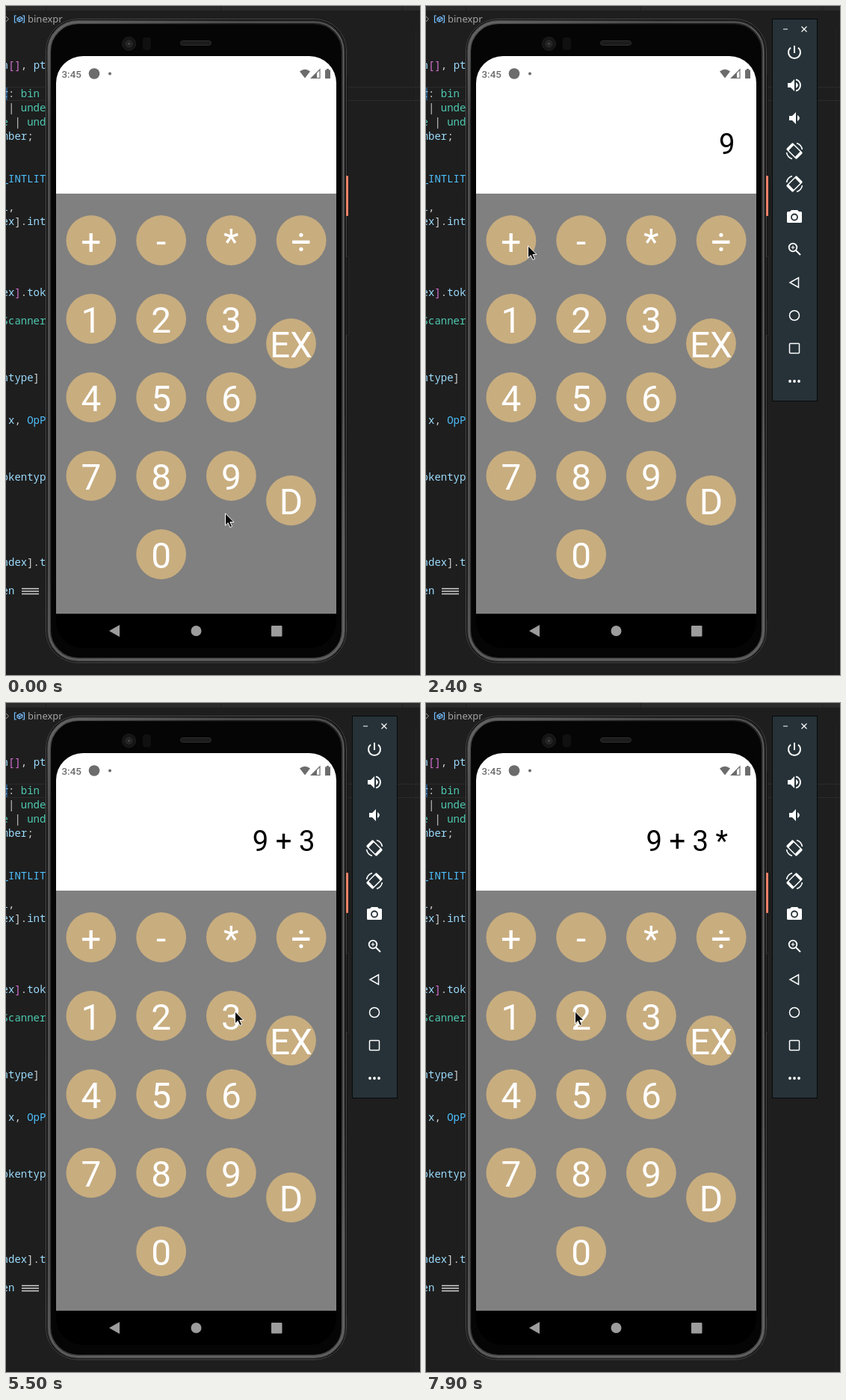
An HTML page for the animation above (8 s loop, 554x895 px).

```html
<!DOCTYPE html>
<html lang="en">
<head>
<meta charset="utf-8">
<title>Calculator</title>
<style>
html, body { margin: 0; width: 100%; height: 100%; overflow: hidden; background: #1e1e1e; }
svg { display: block; width: 554px; height: 895px; }
text { white-space: pre; }
.code { font: 14px "Noto Sans Mono", "DejaVu Sans Mono", monospace; }
.crumb { font: 13px "Noto Sans", sans-serif; fill: #a5a5a5; }
.key { font: 47.75px Roboto, sans-serif; fill: #fff; text-anchor: middle; }
.out { font: 38.2px Roboto, sans-serif; fill: #000; text-anchor: end; }
.clock { font: 500 13.4px Roboto, sans-serif; fill: #6c6c6c; }
.line { fill: none; stroke: #fff; stroke-width: 2; }
.thin { stroke-width: 1.5; }
</style>
</head>
<body>
<svg viewBox="0 0 554 895">
  <defs>
    <linearGradient id="rim" x2=".25" y2="1">
      <stop offset="0" stop-color="#5a5a5a"/>
      <stop offset=".15" stop-color="#2c2c2c"/>
      <stop offset=".8" stop-color="#303030"/>
      <stop offset="1" stop-color="#4c4c4c"/>
    </linearGradient>
  </defs>

  <!-- editor -->
  <rect width="554" height="895" fill="#1e1e1e"/>
  <rect width="554" height="6" fill="#2b2b2c"/>
  <path d="M53.5 0v6M287.5 0v6M530.5 0v6" stroke="#202020"/>
  <path d="M0 108.5H554M0 126.5H554" stroke="#2b2b2b"/>
  <path d="M548.5 30V895" stroke="#232323"/>
  <rect y="109" width="2" height="17" fill="#264f78"/>
  <path d="M-1 13l4.500 4.500l-4.500 4.500" fill="none" stroke="#a0a0a0"/>
  <g fill="none" stroke="#75beff" stroke-width="1.200">
    <path d="M14 13h-2.500v9H14M22 13h2.500v9H22"/>
    <path d="M15 16.500l4-2l3 1.500v3l-4 2l-3-1.500zM15 16.500l3 1.500l4-2M18 18v3"/>
  </g>
  <text class="crumb" x="29" y="22">binexpr</text>
  <g id="code" class="code"></g>
  <path d="M21 779.500H44M21 783H44M21 786.500H44" stroke="#d4d4d4" stroke-width="1.300"/>

  <!-- phone body -->
  <rect x="53" y="17" width="403" height="862" rx="43" fill="#0a0a0a"/>
  <rect x="53.500" y="17.500" width="402" height="861" rx="42.500" fill="none" stroke="#4a4a4a"/>
  <rect x="57.500" y="21.500" width="394" height="853" rx="39" fill="none" stroke="url(#rim)" stroke-width="5"/>
  <rect x="57.500" y="21.500" width="394" height="853" rx="39" fill="none" stroke="#6e6e6e" stroke-width="1.200"/>
  <rect x="61" y="25" width="387" height="846" rx="36" fill="#050505"/>
  <path d="M456.500 92V821" stroke="#111"/>
  <rect x="455" y="227" width="3" height="54" rx="1" fill="#ee8168"/>
  <rect x="455.500" y="335" width="3" height="106" rx="1.500" fill="#151515" stroke="#333" stroke-width=".7"/>
  <circle cx="164.500" cy="50.500" r="9" fill="#151515" stroke="#1e1e1e"/>
  <circle cx="164.500" cy="50.500" r="4.500" fill="#222" stroke="#303030"/>
  <circle cx="164.500" cy="50.500" r="1.500" fill="#484848"/>
  <rect x="183" y="42" width="11" height="17" rx="4" fill="#101010"/>
  <rect x="233.500" y="46.500" width="41" height="6" rx="3" fill="#1c1c1c" stroke="#2d2d2d"/>

  <!-- phone screen -->
  <path d="M67 251V103a36 36 0 0 1 36-36H406a36 36 0 0 1 36 36V251z" fill="#fff"/>
  <rect x="67" y="251" width="375" height="562" fill="#808080"/>
  <path d="M67 813H442V823a36 36 0 0 1-36 36H103a36 36 0 0 1-36-36z" fill="#000"/>
  <text class="clock" x="74.500" y="95.700">3:45</text>
  <g fill="#6c6c6c">
    <circle cx="118" cy="90.500" r="7.300"/>
    <circle cx="139" cy="90.500" r="2"/>
    <path d="M393 87.500q7-5.500 14 0l-7 9z"/>
    <path d="M420 85v11.500h-11.500z" fill="none" stroke="#6c6c6c" stroke-width="1.200"/>
    <path d="M416 89v7.500h-7.500z"/>
    <path d="M427 85.500h2v-1.500h3v1.500h2v11.500h-7z"/>
  </g>
  <g fill="#9c9c9c">
    <path d="M138 836l14-8v16z"/>
    <circle cx="254.500" cy="836" r="7"/>
    <rect x="355" y="829" width="14.500" height="14.500" rx="1"/>
  </g>
  <text id="out" class="out" x="413.400" y="198"></text>
  <g id="keys"></g>

  <!-- emulator toolbar -->
  <g id="panel" fill="#fff">
    <rect x="463.500" y="17.500" width="60" height="511" fill="#263238" stroke="#07090a"/>
    <path class="line" style="stroke-width:1.200" d="M478 31h6M502.500 27.500l7 7m0-7l-7 7"/>
    <g transform="translate(493 62)"><path class="line" d="M0-9V1M-5-6.200A8 8 0 1 0 5-6.200"/></g>
    <g transform="translate(493 106)">
      <path d="M-9-3h4l5-5v16l-5-5h-4zM2-4q6 4 0 8z"/>
      <path class="line" d="M2-7.500A7.700 7.700 0 0 1 2 7.500"/>
    </g>
    <path transform="translate(493 150)" d="M-7-3h4l5-5v16l-5-5h-4zM4-4q6 4 0 8z"/>
    <g id="turn" transform="translate(493 194)">
      <g transform="rotate(45)">
        <rect class="line thin" x="-9" y="-5.500" width="18" height="11" rx="1"/>
        <path d="M-9-5.500h3v11h-3zM6-5.500h3v11h-3z"/>
      </g>
      <path class="line thin" d="M-10.500 2A11 11 0 0 0-3 10.500M10.500-2A11 11 0 0 0 3-10.500"/>
    </g>
    <use href="#turn" transform="translate(986 44) scale(-1 1)"/>
    <g transform="translate(493 282)">
      <path d="M-4-9h8l2 2h2.500q1.500 0 1.500 1.500v12q0 1.500-1.500 1.500h-17q-1.500 0-1.500-1.500v-12q0-1.500 1.500-1.500h2.500z"/>
      <circle cy=".5" r="4" fill="#fff" stroke="#263238" stroke-width="1.800"/>
    </g>
    <g transform="translate(493 325)">
      <circle class="line" cx="-2" cy="-2" r="5.300" style="stroke-width:1.800"/>
      <path class="line" d="M2 2l6 6"/>
      <path class="line" style="stroke-width:1.200" d="M-4.500-2h5M-2-4.500v5"/>
    </g>
    <path class="line thin" d="M487 370l11.500-6.500v13z"/>
    <circle class="line thin" cx="493" cy="414" r="6.500"/>
    <rect class="line thin" x="486.500" y="451.500" width="13" height="13" rx="1"/>
    <circle cx="487" cy="502" r="1.900"/>
    <circle cx="493" cy="502" r="1.900"/>
    <circle cx="499" cy="502" r="1.900"/>
  </g>

  <path id="mouse" d="M.5.8V17l3.700-3.500l2.700 6l2.700-1.200l-2.700-5.900h5.100z" fill="#0a0a0a" stroke="#fff" stroke-width="1"/>
</svg>
<script>
const NS = "http://www.w3.org/2000/svg";
const $ = id => document.getElementById(id);

function add(parent, tag, attrs = {}, text = "") {
  const el = document.createElementNS(NS, tag);
  for (const k in attrs) el.setAttribute(k, attrs[k]);
  el.textContent = text;
  return parent.appendChild(el);
}

// Code fragments: line middle, then colour letter + text, on an 8.4 px grid
const ink = { v: "#9cdcfe", t: "#4ec9b0", c: "#4fc1ff", p: "#d4d4d4", b: "#da70d6" };
const lines = [
  [79, "vn", "b[]", "p, ", "vpt"],
  [117, "vr", "p: ", "tbin"],
  [136, "p | ", "tunde"],
  [155, "te", "p | ", "tund"],
  [174, "vmber", "p;"],
  [231, "c_INTLIT"],
  [269, "vl", "p,"],
  [288, "vex", "p].", "vint"],
  [383, "vex", "b]", "p.", "vtok"],
  [421, "tScanner"],
  [497, "vntype", "p]"],
  [554, "v x", "p, ", "cOpP"],
  [630, "vokentyp"],
  [744, "vndex", "p].", "vt"],
  [782, "ven"]
];
for (const [y, ...parts] of lines) {
  const row = add($("code"), "text", { x: -5.4, y: y + 5 });
  for (const s of parts) add(row, "tspan", { fill: ink[s[0]] }, s.slice(1));
}

const keys = {};
function addKey(label, x, y) {
  const g = keys[label] = add($("keys"), "g");
  add(g, "circle", { cx: x, cy: y, r: 33.4, fill: "#c8ad7f" });
  add(g, "text", { class: "key", x, y: y + 18.8 }, label);
}
["+-*÷", "123", "456", "789", " 0"].forEach((row, r) =>
  [...row].forEach((label, c) => {
    if (label !== " ") addKey(label, 113.9 + 93.75 * c, 313.5 + 105 * r);
  }));
addKey("EX", 381.5, 451.5);
addKey("D", 381.5, 661.5);

// key, press time, release time, display afterwards
const taps = [
  ["9", 1300, 1440, "9"],
  ["+", 2900, 2990, "9 + "],
  ["3", 4700, 4860, "9 + 3"],
  ["*", 6400, 6498, "9 + 3 * "]
];

// time, x, y of the pointer tip
const path = [
  [100, 293, 678], [500, 298, 655], [900, 304, 625], [1000, 304, 625], [1100, 303, 624],
  [1700, 303, 624], [1900, 285, 585], [2100, 240, 500], [2300, 150, 345], [2400, 136, 320],
  [3200, 136, 320], [3700, 198, 398], [3900, 250, 427], [4100, 298, 439], [4200, 311, 432],
  [4300, 308, 422], [4600, 307, 420], [5400, 307, 420], [5500, 306, 412], [5700, 302, 392],
  [6000, 308, 350], [6200, 314, 322], [6300, 310, 312], [6400, 307, 314], [6500, 299, 322],
  [6600, 281, 338], [6800, 262, 362], [7200, 236, 434], [7300, 225, 455], [7400, 213, 467],
  [7500, 203, 460], [7700, 195, 430], [7900, 199, 412]
];

function tip(t) {
  const i = path.findIndex(p => p[0] > t);
  if (i === 0) return path[0].slice(1);
  if (i < 0) return path[path.length - 1].slice(1);
  const a = path[i - 1], b = path[i], k = (t - a[0]) / (b[0] - a[0]);
  return [1, 2].map(n => Math.round(a[n] + (b[n] - a[n]) * k));
}

const ease = k => k < .5 ? 2 * k * k : 1 - 2 * (1 - k) ** 2;

function keyOpacity(t, down, up) {
  if (t < down) return 1;
  if (t < up) return .2;
  return .2 + .8 * ease(Math.min(1, (t - up) / 250));
}

function draw(now) {
  const t = Math.floor(now % 8000 / 100) * 100;
  let shown = "";
  for (const [label, down, up, result] of taps) {
    keys[label].setAttribute("opacity", keyOpacity(t, down, up));
    if (t >= up) shown = result;
  }
  $("out").textContent = shown.replace(/ /g, "\u00a0");
  $("panel").setAttribute("visibility", t >= 1300 ? "visible" : "hidden");
  $("mouse").setAttribute("transform", `translate(${tip(t)})`);
}

const start = performance.now();
function tick() {
  draw(performance.now() - start);
  requestAnimationFrame(tick);
}
tick();
</script>
</body>
</html>
```
